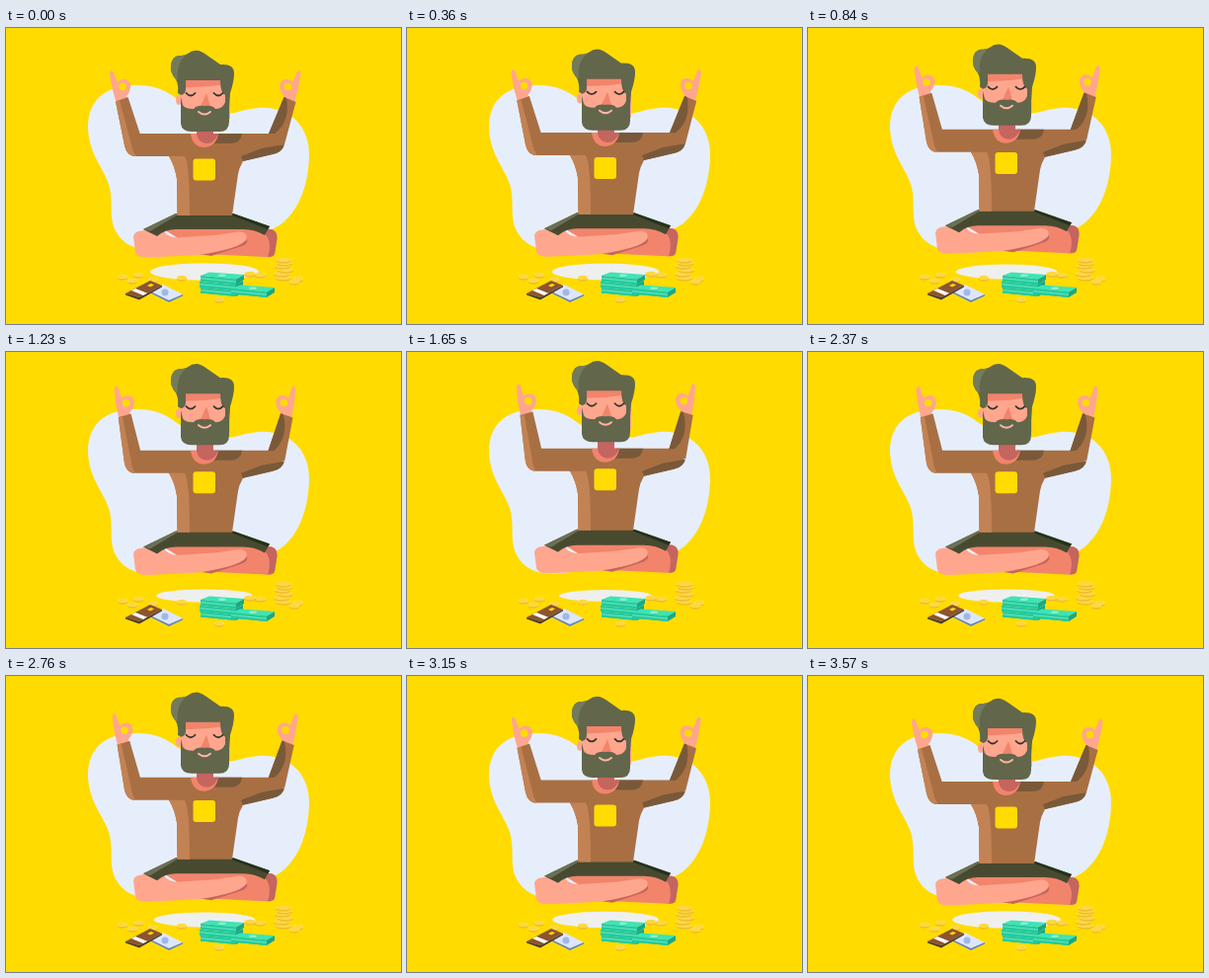
Recreate the animation shown at these times as an HTML page. Size 400 by 300 pixels, loop 3600 ms.

```html
<!DOCTYPE html>
<html lang="en">
<head>
<meta charset="utf-8">
<title>Floating meditation</title>
<style>
  html, body { margin: 0; width: 100%; height: 100%; overflow: hidden; background: #ffdb00; }
  svg { display: block; width: 100vw; height: 100vh; }
  .skin { fill: #ffa68f; }
  .blush { fill: #f2846c; }
  .shade { fill: #c4655f; }
  .shirt { fill: #a86f43; }
  .glow { fill: #c38254; }
  .fold { fill: #79593a; }
  .hair { fill: #62664a; }
  .shorts { fill: #484a30; }
  .line { fill: none; stroke: #33352a; stroke-width: 1.8; stroke-linecap: round; }
</style>
</head>
<body>
<svg viewBox="0 0 400 300">
  <defs>
    <g id="hand">
      <path class="skin" d="M112 77 L108 63 L105 47 Q105 43 107.300 43.500 Q109 44 110 48 L113 55 Q116 51.500 121 52 Q127 54 126 61 Q125 66 122 69 L123 76Z"/>
      <circle cx="118" cy="59.500" r="3.800" fill="#ffdb00"/>
    </g>
  </defs>

  <path fill="#e6eefc" d="M83 101 C83 75 98 59 129 58 C160 57 168 70 180 76 C196 86 215 89 231 86 C246 82 258 79 272 82 C296 87 308 108 307 130 C306 160 297 182 282 196 C262 215 215 210 185 218 C158 226 133 229 118 215 C103 200 108 185 106 168 C104 145 84 133 83 101Z"/>
  <ellipse id="shadow" cx="201" cy="247" fill="#efefee"/>

  <g id="coins"></g>
  <g id="cards">
    <path fill="#dce7ff" d="M146 267 L159 260 L179 270 L165 276Z"/>
    <path fill="#5f83d0" d="M146 267 L165 276 L179 270 V271.500 L165 278 L146 268.500Z"/>
    <circle cx="161" cy="268" r="3.500" fill="#a3b7e6"/>
    <path fill="#8d552f" d="M121 269 L146 256 L158 261 L135 273Z"/>
    <path fill="#4b3a35" d="M121 269 L135 273 L158 261 V262.500 L135 275.500 L121 270.500Z"/>
    <path fill="#fff" d="M127 266 L131 264 L143 268.800 L139 271Z"/>
    <path fill="#ffdb00" d="M143 261 L147 259 L150 260.500 L146 262.500Z"/>
  </g>
  <g id="cash"></g>

  <g id="legs">
    <path class="blush" d="M158 203 H262 L269 204 Q275 206 274.500 214 L272 229 Q271 233 262 232 L200 229Z"/>
    <path class="shade" d="M264 204 Q275 203 274.500 213 L272 229 Q271 232 265 232 Q270 217 262 208Z"/>
    <path class="shade" d="M194 229 L244 214 Q246 219 236 222 L208 231Z"/>
    <path class="skin" d="M146 205 Q130 204 129 211 L131 227 Q132 233 145 232.500 L195 230 Q236 224 243 215 Q246 207 236 206.500 L212 210 L180 212 Q165 214 160 206Z"/>
    <path class="shorts" d="M172 188 H230 L267 201 L262 210 Q252 204 240 204 H172 Q161 204 153 211 L139 204Z"/>
    <path fill="#6c7055" d="M172 188 H176 L146 206 L139 204Z"/>
    <path fill="#25331b" d="M230 188 L267 201 L265 204 L229 190Z"/>
  </g>

  <g id="body">
    <path class="shirt" d="M130 107 H270 L281 119 Q279 126 270 128 L240 135 Q236 142 235 148 L229 190 H173.500 L173 153 Q171 140 165 130 H132 Q123 130 121 121Z"/>
    <path class="glow" d="M165 130 H181 Q186 138 186 190 H173.500 L173 153 Q171 140 165 130Z"/>
    <path class="fold" d="M238 130 L259 122 L282 118 Q280 126 270 128 L240 135Z"/>
    <g class="arm">
      <use href="#hand"/>
      <path class="shirt" d="M111 74.500 L123.500 70 L136 108 L130 130 Q122 129 120 119Z"/>
      <path class="glow" d="M111 74.500 L115 73 L127 118 Q128 125 132 130 Q122 130 120 119Z"/>
    </g>
    <g class="arm">
      <use href="#hand" transform="translate(403.500) scale(-1 1)"/>
      <path class="shirt" d="M293.500 75 L281.500 70 L266 107 L264 120 L282 118Z"/>
      <path class="fold" d="M284 71 L281.500 70 L266 107 H272 Q288 95 284 71Z"/>
    </g>
    <path class="fold" d="M212 107 H239 Q238 117 227 117 H210Z"/>
    <path class="blush" d="M187 107 Q189 121 201 121 Q213 120 215 107Z"/>
    <path class="shade" d="M193 88 H210 V107 H215 Q211 117 203 117 Q194 116 193 107Z"/>
    <rect id="badge" x="189.500" y="132.500" width="22.500" height="22" rx="3" fill="#ffdb00"/>
  </g>

  <g id="head">
    <ellipse class="skin" cx="175" cy="73" rx="3" ry="5"/>
    <path class="skin" d="M177 50 H227 V92 H177Z"/>
    <path class="blush" d="M177 52 H223 V57 Q200 61 177 60Z"/>
    <path class="blush" d="M203 66 L207 79 H197Z"/>
    <path class="hair" d="M172 52 Q166 45 167 38 Q168 29 175 28 Q181 28 184 26 Q189 22 195 23 Q199 24 202 26.500 L217 37 Q231 36 231 46 Q231 54 227 66 L226 80 H222 V68 Q217 66 217 53 H182 V62 Q182 67 177 68 L174 66 Q175 58 172 52Z"/>
    <path fill="#727b5b" d="M172 52 Q166 45 167 38 Q168 29 175 28 Q181 28 184 26 Q172 35 174 52Z"/>
    <path class="hair" d="M177 70 L179 78 Q181 82 190 82 Q193 78 201 79 Q209 78 212 82 Q222 82 223 70 H226 V95 Q226 105 216 105 H188 Q178 105 177 97Z"/>
    <path class="line" d="M182.500 66 Q187 71 191.500 66 M210.500 66 Q215 71 219.500 66"/>
    <path fill="none" stroke="#ffb7a2" stroke-width="2" stroke-linecap="round" d="M195 85 Q201 90 207 85"/>
  </g>
</svg>
<script>
const LOOP = 3600;
const $ = id => document.getElementById(id);
const arms = document.querySelectorAll('.arm');

const coin = (x, y, rx = 6) =>
  `<ellipse cx="${x}" cy="${y + 1.3}" rx="${rx}" ry="2.4" fill="#f0bb2c"/>
   <ellipse cx="${x}" cy="${y}" rx="${rx}" ry="2.2" fill="#ffe04c"/>
   <ellipse cx="${x}" cy="${y}" rx="${rx - 2}" ry="1.1" fill="none" stroke="#f3c636" stroke-width=".6"/>`;

const scattered = [[118, 252], [134, 250], [128, 256], [149, 255], [178, 253],
  [216, 275], [296, 254], [292, 257]];
const stacked = [[281, 253], [279, 249], [283, 245], [280, 241], [282, 238], [281, 235]];
const pile = [[257, 250], [247, 249]];
$('coins').innerHTML = scattered.map(([x, y]) => coin(x, y, 5)).join('') +
  stacked.map(([x, y]) => coin(x, y, 8)).join('') + pile.map(([x, y]) => coin(x, y)).join('');

const bundle = (x, y) => `<g transform="translate(${x} ${y})">
  <path fill="#1aa884" d="M0 0 L36 3.500 L44 -1 V4 L36 9 L0 5.500Z"/>
  <path fill="#25cb9e" d="M0 0 L36 3.500 V9 L0 5.500Z"/>
  <path fill="#3fe3b4" d="M0 0 L9 -3.500 L44 -1 L36 3.500Z"/>
  <path fill="none" stroke="#8cf0d0" stroke-width=".7" d="M0 2.700 L36 6.200"/>
  <ellipse cx="22" cy="-.3" rx="4" ry="1.200" fill="#8cf0d0"/></g>`;
$('cash').innerHTML = bundle(197, 263) + bundle(196, 257) + bundle(197, 251) + bundle(228, 264);

const lift = (el, dy) => el.setAttribute('transform', `translate(0 ${-dy})`);

function draw(now) {
  const rise = (1 - Math.cos(now % LOOP / LOOP * 2 * Math.PI)) / 2;
  lift($('legs'), 8.5 * rise);
  lift($('body'), 9.5 * rise);
  lift($('head'), 14 * rise);
  lift($('badge'), 5 * rise);
  arms[0].setAttribute('transform', `rotate(${5 * rise} 127 115)`);
  arms[1].setAttribute('transform', `rotate(${-5.5 * rise} 275 115)`);
  $('shadow').setAttribute('rx', 55 - 8 * rise);
  $('shadow').setAttribute('ry', 8.7 - 2.7 * rise);
  requestAnimationFrame(draw);
}
draw(performance.now());
</script>
</body>
</html>
```
